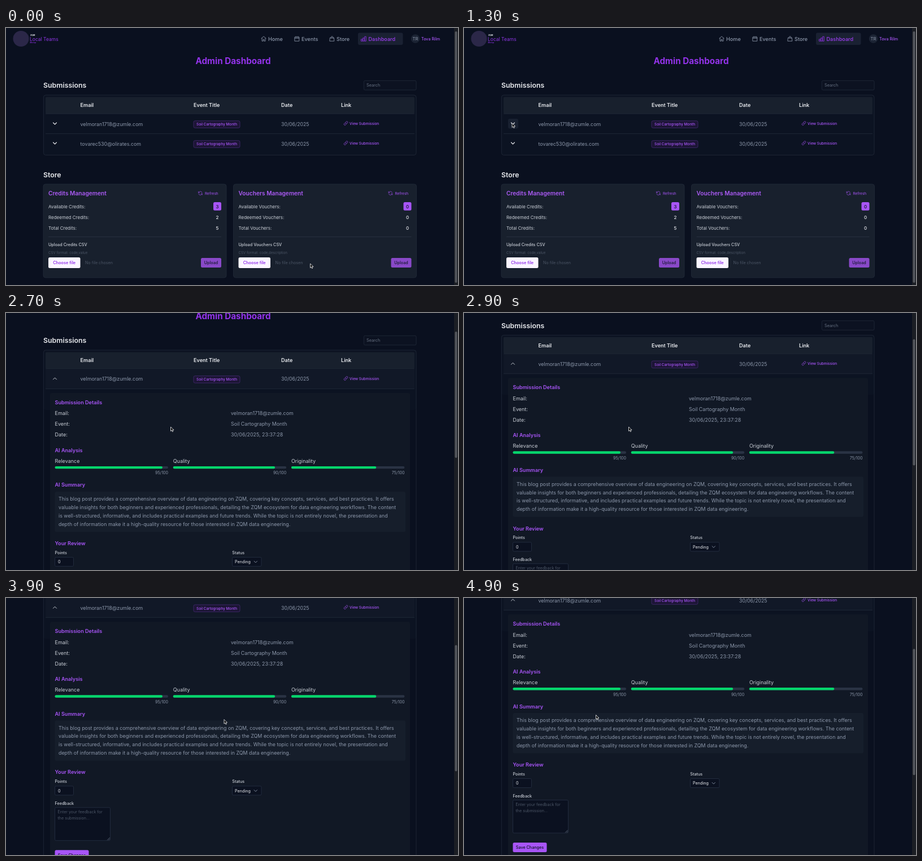
Write an HTML page that moves like this. It is 800x456 px and loops after 5000 ms.

```html
<!DOCTYPE html>
<html lang="en">
<head>
<meta charset="utf-8">
<title>Admin Dashboard</title>
<style>
html, body { margin: 0; width: 100%; height: 100%; overflow: hidden; background: #0a101f; }
svg { display: block; width: 800px; height: 456px; font-family: Inter, "Open Sans", sans-serif; }
text { white-space: pre; }
</style>
</head>
<body>
<svg id="stage" viewBox="0 0 800 456"></svg>
<script>
const WHITE = '#e8eaee', SOFT = '#c9ced6', GREY = '#8c97aa', DIM = '#4b5565';
const PURPLE = '#a855f7', VIOLET = '#9333ea', INK = '#0b1120', LINE = '#222b3a';
const EVENT = 'Soil Cartography Month', EMAIL = 'velmoran1718@zumle.com';

const text = (x, y, s, size = 8.9, fill = GREY, weight = 400, anchor = 'start') =>
  `<text x="${x}" y="${y}" font-size="${size}" fill="${fill}" font-weight="${weight}" text-anchor="${anchor}">${s}</text>`;
const box = (x, y, w, h, fill, r = 0, stroke = 'none') =>
  `<rect x="${x}" y="${y}" width="${w}" height="${h}" rx="${r}" fill="${fill}" stroke="${stroke}" stroke-width=".8"/>`;
const icon = (x, y, d, color, scale = .42, width = 2) =>
  `<path transform="translate(${x} ${y}) scale(${scale})" d="${d}" fill="none" stroke="${color}" stroke-width="${width}" stroke-linecap="round" stroke-linejoin="round"/>`;
const rule = (x, y, w, color = LINE) => box(x, y, w, .8, color);
const group = (id, body) => `<g id="${id}">${body}</g>`;

const ICONS = {
  home: 'M2 11 12 2 22 11M5 9v13h5v-7h4v7h5V9',
  calendar: 'M3 5h18v17H3zM3 10h18M8 2v5M16 2v5',
  bag: 'M4 8h16l1 14H3zM8 11V6a4 4 0 0 1 8 0v5',
  bars: 'M2 14h5v8H2zM9.5 9h5v13h-5zM17 3h5v19h-5z',
  link: 'M10 14a5 5 0 0 0 7 0l4-4a5 5 0 0 0-7-7l-2 2M14 10a5 5 0 0 0-7 0l-4 4a5 5 0 0 0 7 7l2-2',
  refresh: 'M21 9A9 9 0 0 0 5 6L2 9M2 3v6h6M3 15a9 9 0 0 0 16 3l3-3M22 21v-6h-6',
  down: 'M-3 -1.5 0 1.5 3 -1.5',
  up: 'M-3 1.5 0 -1.5 3 1.5'
};

function nav() {
  const item = (x, name, label) =>
    icon(x, 14, ICONS[name], GREY) + text(x + 13, 22.5, label, 9.15, GREY, 500);
  return `<circle cx="26.5" cy="19" r="14" fill="#2b2748"/>` +
    text(43, 14, 'ZQM', 3.6, WHITE, 700) +
    text(42, 23.3, 'Local Teams', 8.5, '#8d35e2') +
    text(42.5, 27.3, 'Meetup', 3, VIOLET, 500) +
    item(451, 'home', 'Home') + item(510, 'calendar', 'Events') + item(572, 'bag', 'Store') +
    box(623, 8.5, 79.5, 21.5, '#1a2132', 3) +
    icon(628, 14, ICONS.bars, VIOLET) + text(641.5, 22.5, 'Dashboard', 9.15, '#9d3df2', 500) +
    `<circle cx="724.5" cy="19" r="7.7" fill="#1c2434"/>` +
    text(724.5, 22, 'TR', 7.8, GREY, 400, 'middle') +
    text(735, 21.7, 'Tova Rilm', 7.2, PURPLE, 500);
}

function row(y, email) {
  return text(131.5, y + 3.5, email) +
    box(332, y - 5.3, 82, 12.6, '#1c1535', 2.5, '#442a70') +
    text(373, y + 3.3, EVENT, 6.35, PURPLE, 500, 'middle') +
    text(487, y + 3.5, '30/06/2025', 8.75) +
    icon(597.5, y - 5, ICONS.link, PURPLE, .34) +
    text(608, y + 1.8, 'View Submission', 6.4, PURPLE, 500);
}

function tableHead() {
  const head = (x, s) => text(x, 140.4, s, 9.1, WHITE, 600);
  return text(402, 64, 'Admin Dashboard', 15.25, VIOLET, 700, 'middle') +
    text(66, 106.3, 'Submissions', 12.35, WHITE, 600) +
    box(633.4, 93.4, 92.6, 16.6, '#0c1221', 2, LINE) + text(638, 104.3, 'Search', 7.3, '#667080') +
    box(70, 122.5, 653, 29.5, '#18202d', 2) + rule(70, 151.7, 653) +
    head(131.5, 'Email') + head(332, 'Event Title') + head(487, 'Date') + head(593, 'Link');
}

function card(x, kind, counts, format) {
  const mid = x + 308;
  const stats = ['Available', 'Redeemed', 'Total'].map((name, i) => {
    const y = 319.5 + i * 19;
    return text(x + 9, y, `${name} ${kind}:`, 8, SOFT) +
      (i ? '' : box(x + 301, 309, 14, 14.7, PURPLE, 2.5)) +
      text(mid, y, counts[i], 8, i ? WHITE : INK, 500, 'middle');
  }).join('');
  return box(x, 277, 324, 166, '#18202d', 4, LINE) +
    text(x + 9, 297, kind + ' Management', 10.2, '#ad5bf7', 600) +
    icon(x + 274, 289.2, ICONS.refresh, PURPLE, .33) +
    text(x + 286, 295.6, 'Refresh', 6.5, PURPLE) + stats +
    rule(x + 9, 370, 306, '#2b3444') +
    text(x + 9, 387, `Upload ${kind} CSV`, 7.25, SOFT, 500) +
    text(x + 9, 400.6, 'CSV format: ' + format, 6.2, DIM) +
    box(x + 9, 407, 56.5, 19, '#faf5ff', 2.5) +
    text(x + 37.2, 419.2, 'Choose file', 7.3, VIOLET, 600, 'middle') +
    text(x + 74, 419.2, 'No file chosen', 7.2, DIM) +
    box(x + 279, 408, 36, 17, '#8949c8', 2.5) +
    text(x + 297, 419.2, 'Upload', 7.15, '#12182a', 500, 'middle');
}

function collapsed() {
  return box(66.4, 119, 659.6, 106.5, 'none', 4, LINE) +
    icon(86.5, 204.5, ICONS.down, WHITE, 1, 1.1) +
    row(205, 'tovarec530@olirates.com') +
    text(66, 264.6, 'Store', 12.3, WHITE, 600) +
    card(66, 'Credits', [3, 2, 5], 'code,value') +
    card(402.5, 'Vouchers', [0, 0, 0], 'code,description');
}

function details() {
  const title = (y, s) => text(86.5, y, s, 9.1, PURPLE, 600);
  const label = (x, y, s) => text(x, y, s, 7.2, SOFT, 500);
  const field = (x, y, w, h) => box(x, y, w, h, INK, 2, '#273144');
  const facts = [['Email', EMAIL], ['Event', EVENT], ['Date', '30/06/2025, 23:37:28']]
    .map(([k, v], i) => text(86.5, 234.5 + i * 19, k + ':', 9, SOFT) + text(398, 234.5 + i * 19, v)).join('');
  const scores = [['Relevance', 95], ['Quality', 90], ['Originality', 75]].map(([name, n], i) => {
    const x = 86.5 + i * 209.2, w = 200.5;
    return text(x, 319, name, 9, SOFT) + box(x, 325, w, 4.4, '#2a3344', 2.2) +
      box(x, 325, w * n / 100, 4.4, '#05d66c', 2.2) +
      text(x + w, 339.6, n + '/100', 7.1, GREY, 400, 'end');
  }).join('');
  const summary = [
    'This blog post provides a comprehensive overview of data engineering on ZQM, covering key concepts, services, and best practices. It offers',
    'valuable insights for both beginners and experienced professionals, detailing the ZQM ecosystem for data engineering workflows. The content',
    'is well-structured, informative, and includes practical examples and future trends. While the topic is not entirely novel, the presentation and',
    'depth of information make it a high-quality resource for those interested in ZQM data engineering.'
  ].map((s, i) => text(93, 386.4 + i * 14.8, s, 8.89)).join('');
  return box(66.4, 119, 659.6, 800, 'none', 4, LINE) +
    box(78, 195, 637, 430, '#111825', 3) +
    title(215, 'Submission Details') + facts +
    title(300, 'AI Analysis') + scores +
    title(361.5, 'AI Summary') + box(86.5, 370, 620.5, 71.5, '#161e2b', 3) + summary +
    title(465.2, 'Your Review') +
    label(86.5, 481, 'Points') + field(86.5, 486.5, 33, 16) + text(92, 497.3, '0', 7.2, WHITE) +
    label(400.3, 481, 'Status') + field(400.5, 486.5, 51.5, 16) + text(405, 497.3, 'Pending', 7.2, WHITE) +
    icon(441.8, 494.7, ICONS.down, GREY, .9, 1) +
    label(86.5, 519.5, 'Feedback') + field(86.5, 524.5, 98, 58.5) +
    text(91.5, 535, 'Enter your feedback for', 7.1, DIM) + text(91.5, 545.6, 'the submission...', 7.1, DIM) +
    icon(179.5, 578, 'M0 4 4 0M2.5 4 4 2.5', GREY, 1, .6) +
    box(86.5, 600, 60, 17, PURPLE, 2.5) + text(116.5, 611.4, 'Save Changes', 7.2, INK, 500, 'middle');
}

document.getElementById('stage').innerHTML =
  group('page', box(66.4, 119, 659.6, 106, '#0c1322', 4) + nav() + tableHead() +
    group('selected', box(70, 152.5, 653, 34.5, '#111827')) + rule(70, 187, 653) +
    group('hover', box(78, 161, 18, 17.5, '#182030', 3)) +
    group('less', icon(86.5, 169.5, ICONS.up, SOFT, 1, 1)) +
    group('more', icon(86.5, 169.5, ICONS.down, WHITE, 1, 1.1)) +
    row(170, EMAIL) + group('closed', collapsed()) + group('open', details())) +
  box(793, 0, 7, 456, '#1b1e24') +
  box(794.5, 6, 4, 446, '#54575d', 2).replace('<rect', '<rect id="thumb"') +
  group('cursor',
    group('arrow', '<path d="M0 0v7.6l1.8-1.6 1.2 2.7 1.3-.6-1.2-2.6h2.4z" fill="#0a0a0a" stroke="#f3f4f6" stroke-width=".8"/>') +
    group('beam', icon(0, 0, 'M-2-4Q0-4 0-2.5 0-4 2-4M0-3V3M-2 4Q0 4 0 2.5 0 4 2 4M-1 .8h2', WHITE, 1, .9)));

// cursor path: time, x, y
const PATH = [
  [300, 538.5, 418], [700, 374, 250], [1100, 85, 169], [2150, 85.5, 168], [2700, 291.5, 202],
  [2900, 291.5, 202], [3100, 313, 167], [3300, 432, 171], [3600, 432, 171], [3900, 386, 215.5],
  [4200, 386, 215.5], [4700, 233.5, 207.5]
];
const $ = id => document.getElementById(id);
const show = (id, on) => $(id).setAttribute('visibility', on ? 'visible' : 'hidden');
const easeOut = (t, start, length) => {
  const u = Math.min(1, Math.max(0, (t - start) / length));
  return 1 - (1 - u) ** 2;
};

function cursorAt(t) {
  const i = PATH.findIndex(p => p[0] > t);
  if (i === 0) return PATH[0].slice(1);
  if (i < 0) return PATH[PATH.length - 1].slice(1);
  const [a, b] = [PATH[i - 1], PATH[i]], u = (t - a[0]) / (b[0] - a[0]);
  return [1, 2].map(k => a[k] + (b[k] - a[k]) * u);
}

function draw() {
  const t = Math.floor(performance.now() % 5000 / 100) * 100; // ten steps a second
  const open = t >= 1900, beam = t >= 3300 && t <= 3600;
  const scroll = 83 * (easeOut(t, 2500, 500) + easeOut(t, 3600, 500));
  const [x, y] = cursorAt(t);
  $('page').setAttribute('transform', `translate(0 ${-scroll})`);
  for (const id of ['open', 'selected', 'less']) show(id, open);
  for (const id of ['closed', 'more']) show(id, !open);
  show('hover', t >= 1100 && t <= 2200);
  $('thumb').setAttribute('y', 6 + scroll * .507);
  $('thumb').setAttribute('height', open ? 224 : 446);
  $('cursor').setAttribute('transform', `translate(${x} ${y})`);
  show('arrow', !beam);
  show('beam', beam);
  requestAnimationFrame(draw);
}
draw();
</script>
</body>
</html>
```
